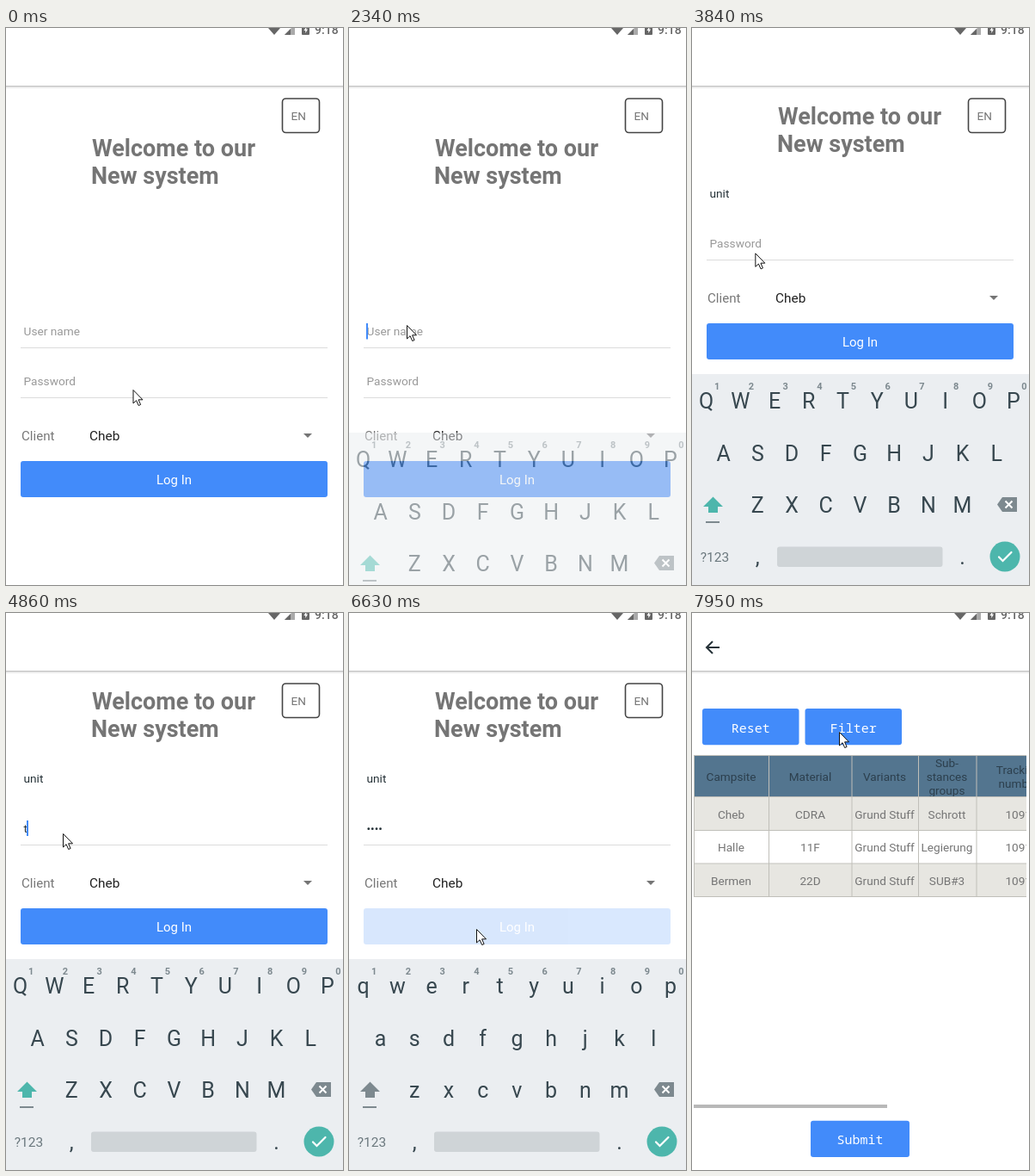
An HTML page that plays this animation: 392 px wide and 647 px high, repeating every 8000 ms.

```html
<!DOCTYPE html>
<html lang="en">
<head>
<meta charset="utf-8">
<style>
  html, body { margin: 0; width: 100%; height: 100%; overflow: hidden; background: #fff; }
  svg { display: block; width: 392px; height: 647px; font-family: Roboto, sans-serif; }
  .mono { font-family: "Noto Sans Mono", monospace; }
</style>
</head>
<body>
<svg id="stage" viewBox="0 0 392 647"></svg>
<script>
const LOOP = 8000;
const BLUE = '#428bfa', TEAL = '#4db6ac', INK = '#37474f';
const USER = 'unit';
const stage = document.getElementById('stage');

// Cursor moves: start, end, number of steps, target x, target y
const moves = [
  [70, 200, 3, 77, 336], [370, 440, 2, 76, 365], [610, 760, 3, 55, 333],
  [910, 1000, 2, 72, 342], [2340, 2340, 1, 67, 345], [3450, 3680, 4, 77, 264],
  [3840, 4000, 3, 66, 256], [5790, 6020, 4, 142, 358], [6560, 6560, 1, 148, 367],
  [6710, 6800, 2, 170, 412], [7110, 7190, 2, 160, 380], [7260, 7490, 4, 228, 230],
  [7570, 7870, 5, 172, 139], [7950, 7950, 1, 171, 138]
];

const userTyped = [[0, ''], [2510, USER.slice(0, 2)], [2590, USER.slice(0, 3)], [2670, USER]];
const passTyped = [[0, ''], [4860, 't'], [4930, '••'], [5020, '•••'], [5100, '••••']];
// Caret: which field it blinks in, '' when hidden
const carets = [[0, ''], [1000, 'user'], [1930, ''], [2180, 'user'], [3130, ''], [3600, 'user'],
  [3840, ''], [4000, 'pass'], [4460, ''], [4860, 'pass'], [5560, ''], [6020, 'pass'], [6560, '']];
const logInAlpha = [[0, 1], [6250, .55], [6330, .2], [6710, 1]];
const pageAlpha = [[0, 0], [6710, .5], [6800, .89], [6880, .97], [6950, 1]];

const at = (track, t) => track.filter(k => k[0] <= t).pop()[1];
const between = (t, a, b) => t >= a && t < b;

const rect = (x, y, w, h, fill, r = 0) =>
  `<rect x="${x}" y="${y}" width="${w}" height="${h}" rx="${r}" fill="${fill}"/>`;
const path = (d, fill, extra = '') => `<path d="${d}" fill="${fill}" ${extra}/>`;
const text = (s, x, y, size, fill, extra = '') =>
  `<text x="${x}" y="${y}" font-size="${size}" fill="${fill}" ${extra}>${s}</text>`;
const mid = (s, x, y, size, fill, extra = '') =>
  text(s, x, y, size, fill, 'text-anchor="middle" ' + extra);
const group = (s, y, alpha = 1) => `<g transform="translate(0 ${y})" opacity="${alpha}">${s}</g>`;
const stroke = (color, width) => `stroke="${color}" stroke-width="${width}"`;

function statusBar() {
  return path('M305 0H319L312 8Z', '#666') + path('M324 8L336 -4V8Z', '#aaa') +
    path('M324 8L331 1V8Z', '#666') + rect(344, -5, 9, 13, '#666', 1) +
    path('M349.5 -2L346.5 3H348.3V6L351 1.5H349.3Z', '#fff') +
    text('9:18', 359, 7, 14, '#666', 'font-weight="500"');
}

const headerLine = rect(0, 67, 392, 1.5, '#c4c4c4') + rect(0, 68.5, 392, 1, '#e2e2e2') +
  rect(0, 69.5, 392, 1, '#f5f5f5');

function login(t) {
  const up = between(t, 2430, 6710);
  const user = at(userTyped, t), pass = at(passTyped, t), caret = at(carets, t);
  const bold = 'font-weight="700"';
  const field = (value, hint, y) =>
    text(value || hint, 20.5, y, 13.7, value ? '#263238' : '#999');
  const userEnd = 20 + [0, 0, 15, 18.5, 23][user.length];
  const passEnd = pass === 't' ? 24 : 20 + pass.length * 4.6;

  const form = field(user, 'User name', 357) + field(pass, 'Password', 415) +
    (up ? '' : rect(17, 371, 357, 1, '#dcdcdc')) + rect(17, 429, 357, 1, '#dcdcdc') +
    (caret === 'user' ? rect(userEnd, 343, 2, 18.5, BLUE) : '') +
    (caret === 'pass' ? rect(passEnd, 401, 2, 18, BLUE) : '') +
    text('Client', 18, 479, 15.1, '#777') + text('Cheb', 97, 479, 15.4, '#212121') +
    path('M346 471H356L351 476Z', '#757575') +
    group(rect(17, 503, 357, 42, BLUE, 3) + mid('Log In', 195.5, 530, 15, '#fff'), 0, at(logInAlpha, t));

  return headerLine +
    group(text('Welcome to our', 100, 149, 27, '#757575', bold) +
      text('New system', 99, 181, 27, '#757575', bold), up ? -37 : 0) +
    `<rect x="321.5" y="82" width="43" height="39.5" rx="4" fill="#fff" ${stroke('#444', 1.6)}/>` +
    text('EN', 331.5, 107, 13.6, '#757575') + group(form, up ? -160 : 0);
}

function keyboard(upper, inPassword) {
  const rows = [['qwertyuiop', 16.7, 442], ['asdfghjkl', 36.6, 502.5], ['zxcvbnm', 76.3, 563]];
  const grey = '#7d898f', icon = 'fill="none" stroke-linecap="round" ' + stroke('#fff', 2.2);
  let s = rect(0, 402, 392, 245, '#ebeef1');
  for (const [keys, x, y] of rows)
    [...(upper ? rows && keys.toUpperCase() : keys)].forEach((k, i) => s += mid(k, x + i * 39.7, y, 25, INK));
  [...'1234567890'].forEach((d, i) =>
    s += mid(d, 29.2 + i * 39.7, 420, 11, grey, 'font-weight="700"'));
  s += path('M24.5 544.5L36 556H30V563H19V556H13Z', upper ? TEAL : grey) + rect(16, 573, 16, 2, grey);
  s += path('M361 545H378V562H361L355 553.5Z', grey) +
    path('M364.5 549.5L372.5 557.5M372.5 549.5L364.5 557.5', 'none', stroke('#fff', 2));
  s += mid('?123', 26.5, 620, 15.5, '#6b787e') + mid(inPassword ? ',' : '@', 76.3, 623, 25, INK) +
    rect(99, 602.5, 192.5, 23.5, '#cfd4d7', 3) + mid('.', 314.5, 623, 25, INK);
  s += `<circle cx="364" cy="614" r="17.5" fill="${TEAL}"/>`;
  s += `<path d="${inPassword ? 'M357 614.5L361.5 619L371.5 609' : 'M362 609L367 614L362 619'}" ${icon}/>`;
  return s;
}

function table() {
  const edges = [2, 89, 185.5, 263, 330.5, 430];
  const centers = [45.5, 137.5, 224, 296.5, 379.7];
  const heads = ['Campsite', 'Material', 'Variants', 'Sub-|stances|groups', 'Tracking|number'];
  const rows = [
    ['Cheb', 'CDRA', 'Grund Stuff', 'Schrott', '1091'],
    ['Halle', '11F', 'Grund Stuff', 'Legierung', '1091'],
    ['Bermen', '22D', 'Grund Stuff', 'SUB#3', '1091']
  ];
  let s = rect(2, 165.5, 388, 48.5, '#53758f');
  heads.forEach((h, c) => {
    const lines = h.split('|');
    lines.forEach((line, i) =>
      s += mid(line, centers[c], 195 + (i - (lines.length - 1) / 2) * 16, 13.6, '#2c3f4d'));
  });
  rows.forEach((row, r) => {
    const y = 214 + r * 38.6;
    s += rect(2, y, 388, 38.6, r % 2 ? '#fff' : '#e7e6e1');
    row.forEach((cell, c) => s += mid(cell, centers[c], y + 24.5, 13.6, '#757575'));
  });
  const ys = [165.5, 213.5, 252.5, 291, 329.5];
  const grid = ys.map(y => `M2 ${y}H389`).join('') + edges.map(x => `M${x + .5} 165V330`).join('');
  s += path(grid, 'none', stroke('#c0bfb9', 1));
  return `<svg width="389" height="647" viewBox="0 0 389 647" style="width:389px">${s}</svg>`;
}

function listPage(t) {
  const button = (label, x, y, w) => rect(x, y, w, 42.3, BLUE, 3) +
    mid(label, x + w / 2, y + 27.5, 15, '#fff', 'class="mono"');
  const arrow = path('M32 40H17.5M24 33L17 40L24 47', 'none', stroke('#263238', 2));
  const s = rect(0, 12, 392, 640, '#fff') + headerLine + (t >= 6950 ? arrow : '') +
    button('Reset', 12, 111, 112.5) + button('Filter', 131.5, 111, 112.5) + table() +
    rect(2, 571, 225, 4, '#b8b8b8') + button('Submit', 138, 589.7, 115);
  return group(s, t < 6800 ? 6 : t < 6880 ? 1 : 0, at(pageAlpha, t));
}

function cursor(t) {
  let x = 147.5, y = 420;
  for (const [start, end, steps, tx, ty] of moves) {
    if (t < start) break;
    const done = 1 + Math.floor((t - start) / (end - start) * (steps - 1) || 0);
    const f = Math.min(1, done / steps);
    x += (tx - x) * f;
    y += (ty - y) * f;
  }
  return `<g transform="translate(${x + .5} ${y + .5})">` +
    path('M0 0V15.5L3.6 12.2L6.2 18L8.6 17L6.1 11.3H11Z', '#fff', stroke('#111', 1)) + '</g>';
}

function scene(t) {
  let s = rect(0, 0, 392, 647, '#fff');
  if (t < 6950) s += login(t);
  if (between(t, 2340, 6710)) {
    const upper = t < 2510 || between(t, 3840, 4930);
    const opening = t < 2430;
    s += group(keyboard(upper, t >= 3840), opening ? 68 : 0, opening ? .5 : 1);
  }
  if (t >= 6710) s += listPage(t);
  return s + statusBar() + cursor(t);
}

let last = '';
function frame(now) {
  const next = scene(now % LOOP);
  if (next !== last) stage.innerHTML = last = next;
  requestAnimationFrame(frame);
}
frame(0);
</script>
</body>
</html>
```
